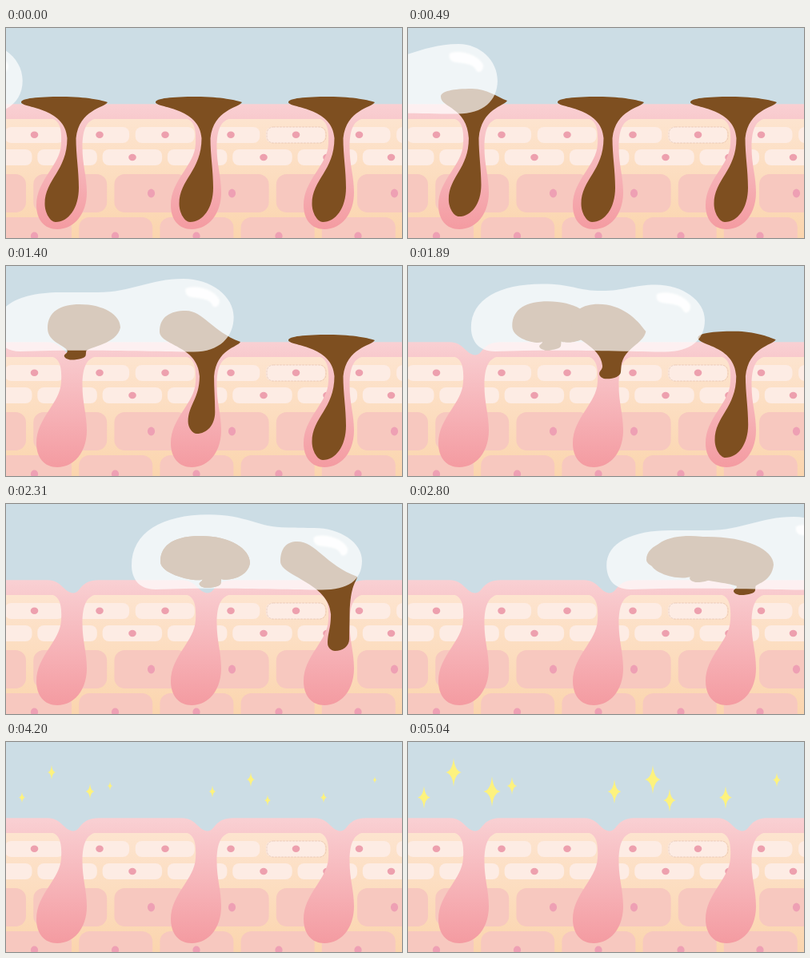
An HTML page that plays this animation: 495 by 263 pixels, repeating every 5110 ms.

```html
<!DOCTYPE html>
<html lang="en">
<head>
<meta charset="utf-8">
<title>Pore cleansing</title>
<style>
  html, body { margin: 0; width: 100%; height: 100%; overflow: hidden; background: #ccdde5; }
  svg { display: block; width: 100%; height: 100%; }
</style>
</head>
<body>
<svg viewBox="0 0 495 263">
  <defs>
    <linearGradient id="dermis" gradientUnits="userSpaceOnUse" x1="0" y1="114" x2="0" y2="263">
      <stop offset="0" stop-color="#fde4cf"/><stop offset="1" stop-color="#fbd5ae"/>
    </linearGradient>
    <linearGradient id="pink" gradientUnits="userSpaceOnUse" x1="0" y1="95" x2="0" y2="252">
      <stop offset="0" stop-color="#f9d0d3"/><stop offset="1" stop-color="#f49ba1"/>
    </linearGradient>
    <filter id="soft" x="-20%" y="-20%" width="140%" height="140%"><feGaussianBlur stdDeviation="1"/></filter>
  </defs>
  <rect width="495" height="263" fill="#ccdde5"/>
  <rect y="113" width="495" height="150" fill="url(#dermis)"/>
  <g id="cells"></g>
  <g id="skin" fill="url(#pink)"></g>
  <g id="plugs" fill="#7e4f20"></g>
  <path id="drop" fill="#fff" fill-opacity=".7"/>
  <path id="shine" fill="#fff" fill-opacity=".95" filter="url(#soft)"
    d="M52,32C60,27 87,31 94,46C95,55 87,58 85,52C80,43 66,45 56,42C52,40 51,36 52,32Z"/>
  <g id="stars" fill="#fdf27e"></g>
</svg>
<script>
const LOOP = 5110, STEP = 70;
const PORES = [0, 168, 334];
const $ = id => document.getElementById(id);
const mix = (a, b, k) => a + (b - a) * k;

function add(parent, tag, attrs) {
  const el = document.createElementNS('http://www.w3.org/2000/svg', tag);
  for (const k in attrs) el.setAttribute(k, attrs[k]);
  return parent.appendChild(el);
}

// ---------- skin ----------
function cellRow(first, pitch, width, y, height, rx, fill) {
  for (let x = first; x < 495; x += pitch) add($('cells'), 'rect', { x, y, width, height, rx, fill });
}
function nuclei(xs, cy, rx, ry, fill) {
  for (const cx of xs) add($('cells'), 'ellipse', { cx, cy, rx, ry, fill });
}
cellRow(-1.5, 81.6, 74, 124, 20, 8, '#fdece4');
cellRow(-42, 81.3, 74.5, 152, 20, 8, '#fdece4');
cellRow(-67, 101.2, 92, 183, 48, 13, '#f7c8bf');
cellRow(-10, 101.2, 92, 237, 48, 13, '#f7c8bf');
add($('cells'), 'rect', { x: 326, y: 124, width: 74, height: 20, rx: 8,
  fill: 'none', stroke: '#d9b29f', 'stroke-width': .5, 'stroke-dasharray': '3 1' });
nuclei([35.5, 117, 199, 281, 362.5, 441.5], 133.7, 4.8, 4.2, '#eda0ae');
nuclei([158, 322, 401, 481.5], 162, 4.8, 4.2, '#eda0ae');
nuclei([181.5, 282.5, 485.5], 207, 4.6, 5.4, '#eea0b4');
nuclei([35.5, 136.5, 238, 341, 440], 260.5, 4.6, 5, '#eea0b4');

let surface = 'M0,95.3';
for (const x of PORES) {
  const c = x + 84;
  surface += `H${c - 32}C${c - 14},95.3 ${c - 12},111 ${c},111.5C${c + 10},111.5 ${c + 8},95.3 ${c + 32},95.3`;
  add($('skin'), 'path', { transform: `translate(${x})`,
    d: 'M54,113C68,114 70,128 69,145C68,172 38,190 38,222C38,240 48,252 64,252' +
       'C86,252 101,232 101,206C101,185 95.5,172 95.5,150C95.5,130 99,114 116,113Z' });
}
add($('skin'), 'path', { d: surface + 'H495V114H0Z' });

// ---------- keyed poses ----------
function poseAt(keys, t) {
  let i = 1;
  while (i < keys.length - 1 && t > keys[i][0]) i++;
  const [t0, a] = keys[i - 1], [t1, b] = keys[i];
  const k = Math.min(1, Math.max(0, (t - t0) / (t1 - t0)));
  const pose = {};
  for (const p in a) pose[p] = mix(a[p], b[p], k);
  return pose;
}

// ---------- plugs ----------
// cap: left end (l, ly), top (tx, ty), right tip (r, ry); b: depth of the stem; g: roundness; x: shift
const full   = { x: 0, l: 19, ly: 93, tx: 70, ty: 86, r: 127, ry: 93, b: 243, g: 0 };
const lifted = { x: 0, l: 41, ly: 86, tx: 80, ty: 76, r: 124, ry: 91, b: 236, g: 0 };
const pulled = { x: 0, l: 24, ly: 82, tx: 57, ty: 56, r: 125, ry: 95, b: 210, g: 0 };
const thin   = { x: 0, l: 9,  ly: 72, tx: 30, ty: 47, r: 105, ry: 91, b: 184, g: 0 };
const loose  = { x: 0, l: 52, ly: 78, tx: 92, ty: 48, r: 143, ry: 77, b: 117.5, g: 1 };
const lump   = { x: 168, l: 25, ly: 72, tx: 75, ty: 40, r: 137, ry: 74, b: 105, g: 1 };
const big    = { x: 334, l: -36, ly: 70, tx: 40, ty: 41, r: 123, ry: 76, b: 114, g: 1 };

const at = (x, pose) => ({ ...pose, x });
const [, D2, D3] = PORES;
const plugs = [
  { end: 2310, keys: [[70, full], [490, lifted], [800, pulled], [1000, thin], [1400, loose],
    [1540, { ...loose, x: 26, b: 106 }], [2310, lump]] },
  { end: 2800, keys: [[900, at(D2, full)], [1060, at(D2, lifted)], [1400, at(D2, pulled)],
    [1640, at(D2, thin)], [2030, at(D2, loose)], [2310, lump], [2800, { ...lump, x: 278, b: 98 }]] },
  { end: 4200, keys: [[1800, at(D3, full)], [2010, at(D3, lifted)], [2175, at(D3, pulled)],
    [2310, at(D3, thin)], [2800, big], [2940, { ...big, x: 363, b: 99 }], [4200, { ...big, x: 626, b: 99 }]] }
];
for (const p of plugs) p.el = add($('plugs'), 'path', {});

function plugPath({ l, ly, tx, ty, r, ry, b, g }) {
  const h = ry - ty, sharp = (1 - g) * h;
  const u = Math.min(1, (243 - b) / 58);           // 0 = deep and bulbous, 1 = short and straight
  const s = Math.max(0, 185 - b) * .07;            // the pore leans right towards its mouth
  const neckY = Math.min(138, b - 25 + 14 * g);
  const neckL = 76.5 - 4.5 * u + s, neckR = 87.5 + 8 * u + s;
  const bx = 62 + 15 * u + s, bulbL = 48.5 + 19.5 * u + s, bulbR = 91 + 4 * u + s;
  const leftY = b - 23 + 14 * u + 4 * g, rightY = b - 43 + 28 * u + 9 * g;
  return [
    'M', l, ly,
    'C', l, mix(ty, ly, .3), mix(l, tx, .4), ty, tx, ty,
    'C', mix(tx, r, .6) - .5 * sharp, ty, r - .9 * sharp, ry - h * (.33 + .2 * g), r, ry,
    'C', mix(r, neckR, .1), ry + 7 + 14 * g, mix(neckR, r, .1), mix(neckY, ry, .8) + 18 * g, neckR, neckY,
    'C', neckR, mix(neckY, rightY, .35), bulbR, mix(rightY, neckY, .35), bulbR, rightY,
    'C', bulbR, mix(rightY, b, .6), mix(bx, bulbR, .55), b, bx, b,
    'C', mix(bx, bulbL, .5), b, bulbL, mix(leftY, b, .5), bulbL, leftY,
    'C', bulbL, mix(leftY, neckY, .37), neckL, mix(neckY, leftY, .5), neckL, neckY,
    'C', neckL - 2, 99, l, Math.min(100, ly + 18), l, ly, 'Z'
  ].join(' ');
}

// ---------- drop, x measured from its rear end ----------
// rear hump (ax, ay), waist (wx, wy), front hump (fx, fy), front end (ex, ey)
const young  = { ax: 75, ay: 42, wx: 130, wy: 42, fx: 245, fy: 20, ex: 293.6, ey: 66 };
const headUp = { ax: 80, ay: 33, wx: 127, wy: 33, fx: 234, fy: 16, ex: 297, ey: 64 };
const tailUp = { ax: 96, ay: 13.3, wx: 195, wy: 29.5, fx: 228, fy: 30, ex: 288, ey: 71 };
const dropKeys = [[490, young], [1400, headUp], [2310, tailUp], [2800, headUp]];
const rear = t => 157 + (t - 2310) * .1861;

function dropPath({ ax, ay, wx, wy, fx, fy, ex, ey }) {
  return [
    'M', 0, 77,
    'C', 0, mix(77, ay, .65), ax * .4, ay, ax, ay,
    'C', mix(ax, wx, .5), ay, mix(ax, wx, .6), wy, wx, wy,
    'C', mix(wx, fx, .4), wy, mix(wx, fx, .6), fy, fx, fy,
    'C', mix(fx, ex, .55), fy, ex, mix(ey, fy, .55), ex, ey,
    'C', ex, ey + 25, ex - 18, 107.5, ex - 50, 107.5,
    'C', ex - 95, 107.5, 110, 104, 30, 107,
    'C', 8, 107, 0, 92, 0, 77, 'Z'
  ].join(' ');
}

// ---------- stars: x, y, half height ----------
const stars = [
  [20, 69.5, 14], [57, 38, 18], [105, 62, 19], [130, 55, 11], [258, 62, 15],
  [306, 47, 18], [327, 73, 14], [397, 69.5, 14], [461, 47.5, 9]
].map(([x, y, h]) => {
  const w = h * .56, s = w * .15;
  const d = `M0,${-h}Q${s},${-s} ${w},0Q${s},${s} 0,${h}Q${-s},${s} ${-w},0Q${-s},${-s} 0,${-h}Z`;
  return { x, y, el: add($('stars'), 'path', { d }) };
});
function starSize(t) {
  if (t < 4060) return 0;
  if (t < 4480) return Math.sin((t - 4060) / 420 * Math.PI / 2);
  return .8 + .2 * Math.cos((t - 4480) / 560 * 2 * Math.PI);
}

function place(el, x, y, size = 1) {
  el.setAttribute('transform', `translate(${x.toFixed(2)} ${y.toFixed(2)}) scale(${size.toFixed(3)})`);
}

function draw(t) {
  for (const p of plugs) {
    const pose = poseAt(p.keys, t);
    p.el.setAttribute('d', t <= p.end ? plugPath(pose) : '');
    place(p.el, pose.x, 0);
  }
  const x = rear(t), drop = poseAt(dropKeys, t);
  $('drop').setAttribute('d', dropPath(drop));
  place($('drop'), x, 0);
  place($('shine'), x + drop.ex - 112, (drop.ey - 66) * 1.9);
  for (const s of stars) place(s.el, s.x, s.y, starSize(t));
}

const start = performance.now();
function tick() {
  const t = (performance.now() - start) % LOOP;
  draw(Math.floor(t / STEP) * STEP);
  requestAnimationFrame(tick);
}
tick();
</script>
</body>
</html>
```
